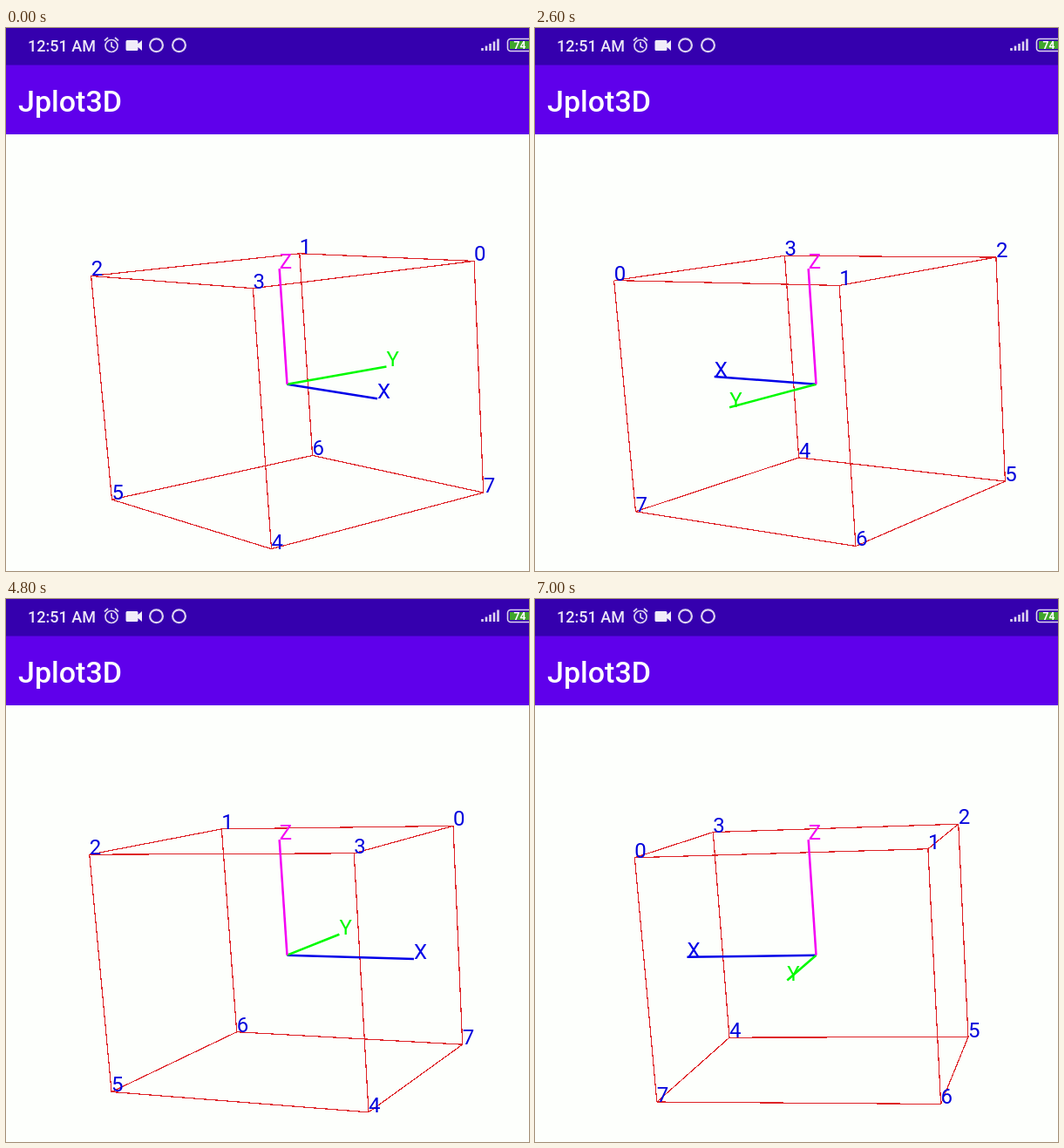
Write an HTML page that moves like this. It is 600 by 623 pixels and loops after 7100 ms.

```html
<!DOCTYPE html>
<html lang="en">
<head>
<meta charset="utf-8">
<title>Rotating box</title>
<style>
  html, body { margin: 0; width: 100%; height: 100%; overflow: hidden; background: #fdfffc; }
  svg { display: block; font-family: Roboto, sans-serif; }
  .edges { stroke: #de2226; stroke-width: 1.2; shape-rendering: crispEdges; }
  .axes { stroke-width: 2.5; }
  .labels { font-size: 24px; }
</style>
</head>
<body>
<svg width="600" height="623" viewBox="0 0 600 623">
  <rect width="600" height="623" fill="#fdfffc"/>
  <rect width="600" height="122" fill="#5f00eb"/>
  <rect width="600" height="42.500" fill="#3500ae"/>

  <text x="25" y="26.500" font-size="18" font-weight="500" fill="#ece6f7">12:51 AM</text>
  <g fill="none" stroke="#ddd4f0" stroke-width="1.700">
    <circle cx="121" cy="20.500" r="7"/>
    <path d="M121 16v5l3.500 2M113 14.500l4-3.500M129 14.500l-4-3.500"/>
    <circle cx="172.500" cy="19.700" r="7.400" stroke-width="2.200"/>
    <circle cx="198.500" cy="19.700" r="7.400" stroke-width="2.200"/>
  </g>
  <path fill="#f1edf9" d="M139 14h11q1.500 0 1.500 1.500v2.500l4.500-4v12l-4.500-4v2.500q0 1.500-1.500 1.500h-11q-1.500 0-1.500-1.500v-9q0-1.500 1.500-1.500z"/>
  <path stroke="#ddd4f0" stroke-width="2.600" d="M546.500 26v-3M551 26v-5.500M555.500 26v-8M560 26v-10.500M564.500 26v-13.500"/>
  <rect x="575.500" y="12.500" width="32" height="14" rx="3.500" fill="#3500ae" stroke="#ddd4f0" stroke-width="1.600"/>
  <rect x="578" y="15" width="22" height="9" fill="#40a52c"/>
  <text x="582.500" y="24" font-size="12" font-weight="700" fill="#fff">74</text>

  <text x="14" y="96" font-size="34" font-weight="500" fill="#fff">Jplot3D</text>

  <g class="edges" id="edges"></g>
  <g class="axes" id="axes"></g>
  <g class="labels" id="labels"></g>
</svg>
<script>
const FRAME = 100, FRAMES = 71;
const EDGES = ['01', '12', '23', '30', '45', '56', '67', '74', '07', '16', '25', '34'];
const AXES = [['X', '#0000e8'], ['Y', '#00fa00'], ['Z', '#f400f4']];
// [step, degrees]
const TURN = [[0, -6.5], [12, -65.5], [19, -116.5], [32, -219], [41, -286], [54, -386.2], [70, -506.3]];

function add(parent, tag, attrs, text = '') {
  const el = document.createElementNS('http://www.w3.org/2000/svg', tag);
  set(el, attrs);
  el.textContent = text;
  return document.getElementById(parent).appendChild(el);
}

function set(el, attrs) {
  for (const key in attrs) el.setAttribute(key, attrs[key]);
}

const edges = EDGES.map(() => add('edges', 'line', {}));
const axes = AXES.map(([, stroke]) => add('axes', 'line', { stroke }));
const names = AXES.map(([name, fill]) => add('labels', 'text', { fill }, name));
const digits = [...'01234567'].map(n => add('labels', 'text', { fill: '#0000dc' }, n));

function angleAt(step) {
  const i = Math.max(1, TURN.findIndex(([s]) => s >= step));
  const [s0, a0] = TURN[i - 1], [s1, a1] = TURN[i];
  return a0 + (a1 - a0) * (step - s0) / (s1 - s0);
}

// Perspective view of a point given by azimuth, radius and height
function project(deg, r, z) {
  const a = deg * Math.PI / 180, c = r * Math.cos(a), s = r * Math.sin(a);
  const w = 1 - 0.0017 * c + 0.1323 * s - 0.016 * z;
  return [
    322.5 + (217.7 * c - 8.7 * z) / w,
    408.7 - (10.3 * c + 35.75 * s + 130.5 * z) / w
  ];
}

function join(line, [x1, y1], [x2, y2]) {
  set(line, { x1, y1, x2, y2 });
}

function place(label, [x, y]) {
  set(label, { x, y });
}

function draw(step) {
  const turn = angleAt(step);
  const corners = digits.map((_, i) =>
    i < 4 ? project(turn + 90 * i, 1, 1) : project(turn + 90 * (7 - i), 1, -1));
  const tips = [
    project(turn - 45, Math.SQRT1_2, 0),
    project(turn + 45, Math.SQRT1_2, 0),
    project(0, 0, 1)
  ];
  EDGES.forEach(([a, b], i) => join(edges[i], corners[a], corners[b]));
  digits.forEach((label, i) => place(label, corners[i]));
  tips.forEach((tip, i) => {
    join(axes[i], project(0, 0, 0), tip);
    place(names[i], tip);
  });
}

const start = performance.now();
function tick() {
  draw(Math.floor((performance.now() - start) / FRAME) % FRAMES);
  requestAnimationFrame(tick);
}
tick();
</script>
</body>
</html>
```
